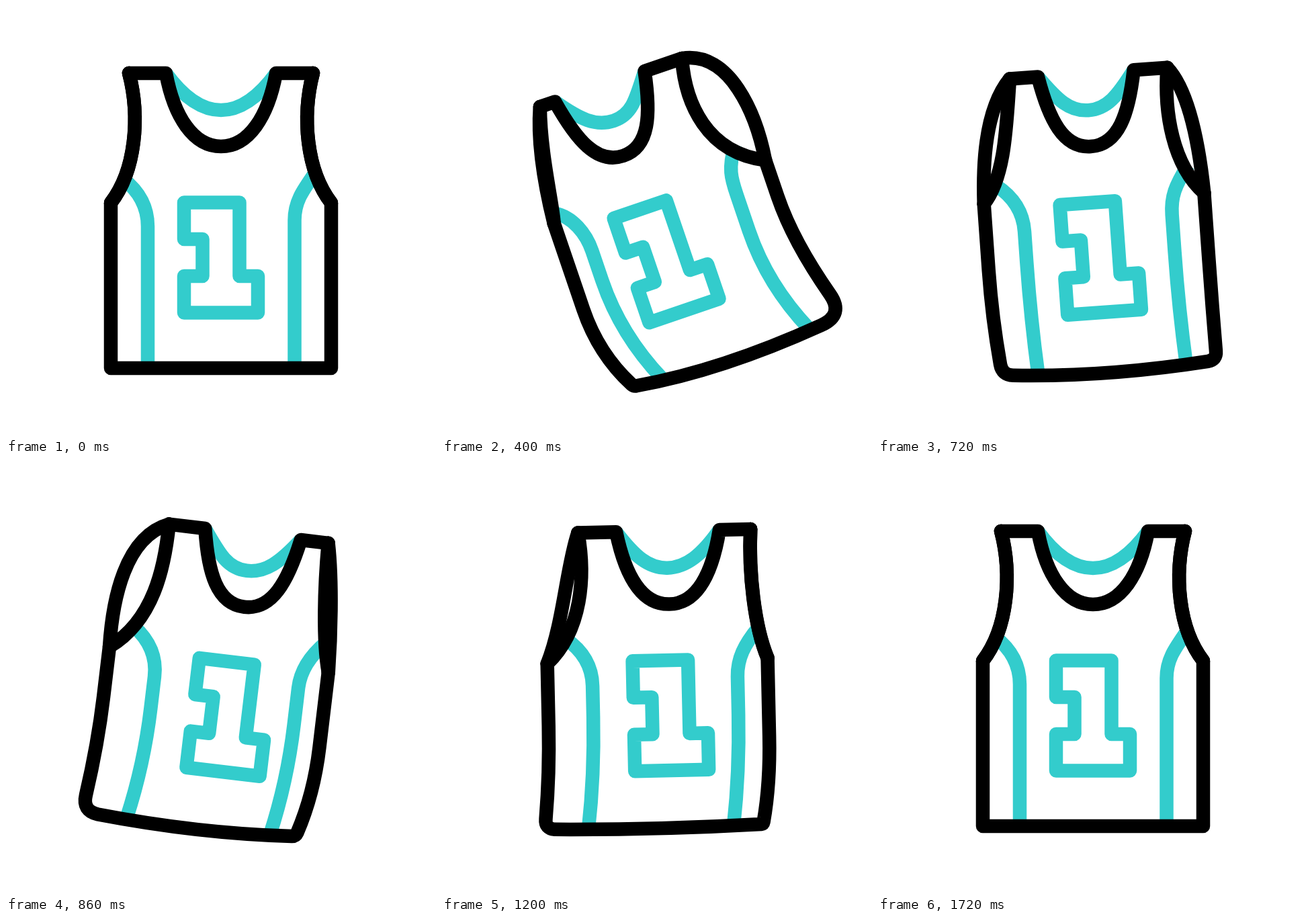
Animation of 640 by 640 pixels, one loop 1760 ms. Source, as an HTML page with a canvas:

```html
<!DOCTYPE html>
<html>
<head>
<meta charset="utf-8">
<title>Jersey</title>
<style>
html, body { margin: 0; height: 100%; overflow: hidden; background: #fff; }
canvas { display: block; width: 100vmin; height: 100vmin; }
</style>
</head>
<body>
<canvas width="640" height="640"></canvas>
<script>
const ctx = document.querySelector('canvas').getContext('2d');
const LOOP = 1760, STEP = 20, TEAL = '#33cccc', BLACK = '#000';

// Swing of the whole shirt: turning points joined by sine easing.
const swingTimes = [0, 455, 970, 1310, 1720];
const swingAngles = [0, -19.5, 10, -4.75, 0];

function swing(t) {
  const i = swingTimes.findIndex(k => k > t) - 1;
  if (i < 0) return 0;
  const x = (t - swingTimes[i]) / (swingTimes[i + 1] - swingTimes[i]);
  const ease = (1 - Math.cos(Math.PI * x)) / 2;
  return swingAngles[i] + (swingAngles[i + 1] - swingAngles[i]) * ease;
}

// Shifts from the rest shape at 240, 560, 720, 1020 and 1400 ms.
const tracks = {
  number: [-12.8, -20.2, 3.5, 33.8, 9.1],
  strapL: [2, 9, 24.5, 44, 11],
  neckL: [-13, -20, 11.5, 47.5, 12],
  neckR: [-25, -41, -9.5, 28, 7],
  strapR: [-21, -38, -14.5, 11, 3],
  frontL: [-15, -27, -2, 33, 6.5],
  frontR: [-16, -39, -7, 34, 10],
  backL: [-15, -32, -35, -42, 5],
  backR: [20, 43, 35, 33, 10],
  pitL: [-12, -20, -10, 2, 0],
  pitR: [-4, -9, -3, -2, 0],
  hemL: [18, 31, 9, -19, -3],
  hemR: [18, 34, 1, -26, -4],
  roundL: [2, 4, 16, 26, 8],
  roundR: [18, 34, 13, 3, 3],
  bow: [5, 9, 7, 6, 1],
  stripeR: [-2, -2, 4.6, 16, 5.5]
};
const times = [0, 240, 455, 560, 720, 970, 1020, 1200, 1400, 1720];

function keys([a, b, c, d, e]) {
  return [0, a, b * 1.17, b, c, d * 1.04, d, e + (d - e) * 0.36, e, 0];
}

// Hermite curve through the keys that never overshoots them.
function spline(v, t) {
  const i = times.findIndex(k => k > t) - 1;
  if (i < 0) return 0;
  const slope = j => (v[j + 1] - v[j]) / (times[j + 1] - times[j]);
  const tangent = j => {
    if (j === 0 || j === times.length - 1) return 0;
    const a = slope(j - 1), b = slope(j);
    return a * b > 0 ? 2 * a * b / (a + b) : 0;
  };
  const h = times[i + 1] - times[i], x = (t - times[i]) / h, y = 1 - x;
  return v[i] * (1 + 2 * x) * y * y + v[i + 1] * (1 + 2 * y) * x * x
    + h * x * y * (tangent(i) * y - tangent(i + 1) * x);
}

for (const name in tracks) tracks[name] = keys(tracks[name]);

function stroke(d, color) {
  ctx.strokeStyle = color;
  ctx.stroke(new Path2D(d));
}

// Armhole; lift pulls the curve up where the far side shows.
function arm(x, side, bend, lift, pitX, pitY) {
  const x1 = x.rest + side * 17 + bend, x2 = x.rest + side * 10 + bend;
  return `M${x.rest + x.shift} 100C${x1} ${165 - lift * 0.6} `
    + `${x2} ${245 - lift * 0.36} ${pitX} ${pitY}`;
}

function stripe(x0, y0, x1, y1, x, y, bottom) {
  return `M${x0} ${y0}C${x1} ${y1} ${x} ${y - 27} ${x} ${y}`
    + `L${x} 375Q${x} 460 ${bottom} 542`;
}

// Side seam with a rounded lower corner; the rounder side bends earlier.
function seam(x, hem, round) {
  const y = 485 - 2 * round;
  const k = round / Math.hypot(x - hem, y - 539);
  return {
    start: `${x} ${y - 70}`,
    bend: `${x} ${y}`,
    end: `${hem + (x - hem) * k} ${539 + (y - 539) * k}`
  };
}

function draw(t) {
  const p = {};
  for (const name in tracks) p[name] = spline(tracks[name], t);

  ctx.setTransform(1, 0, 0, 1, 0, 0);
  ctx.fillStyle = '#fff';
  ctx.fillRect(0, 0, 640, 640);
  ctx.translate(320, 265);
  ctx.rotate(swing(t) * Math.PI / 180);
  ctx.translate(-320, -265);
  ctx.lineWidth = 20.5;
  ctx.lineJoin = 'round';
  ctx.lineCap = 'butt';

  // Back collar
  const turn = (p.neckL + p.neckR) / 2;
  const nl = 238 + p.neckL, nr = 402 + p.neckR, nm = 320 + turn;
  const cm = 320 + turn * 0.9;
  stroke(`M${nl} 100C${nl + 27} 137 ${cm - 28} 155 ${cm} 155`
    + `S${nr - 27} 137 ${nr} 100`, TEAL);

  // Side stripes
  const bend = (p.hemL + p.hemR) * 0.53;
  const top = p.number * 0.55, mid = p.number * 0.65;
  const sl = 211 + mid, sr = 429.5 + p.stripeR;
  const yl1 = 277 - Math.max(0, -p.number) * 0.3;
  const yr1 = 277 - Math.max(0, p.number) * 0.3;
  stroke(stripe(174 + top, 257, 200 + mid, yl1, sl, 328, sl + bend), TEAL);
  stroke(stripe(461 + top, 247, 440 + top, yr1, sr, 319, sr + bend), TEAL);

  // Armholes, back and front
  ctx.lineCap = 'round';
  const yl = 293 + p.pitL, yr = 293 + p.pitR;
  const left = { rest: 183, shift: p.strapL };
  const right = { rest: 457, shift: p.strapR };
  const openL = Math.max(0, p.frontL - p.backL);
  const openR = Math.max(0, p.backR - p.frontR);
  stroke(arm(left, 1, p.backL, openL, 156, yl), BLACK);
  stroke(arm(right, -1, p.backR, openR, 484, yr), BLACK);
  stroke(arm(left, 1, p.frontL, 0, 156, yl), BLACK);
  stroke(arm(right, -1, p.frontR, 0, 484, yr), BLACK);

  // Straps and neckline
  stroke(`M${183 + p.strapL} 100L${nl} 100`
    + `C${nl + 12} 165 ${nm - 41} 209 ${nm} 209`
    + `S${nr - 12} 165 ${nr} 100L${457 + p.strapR} 100`, BLACK);

  // Sides and hem
  const hl = 156 + p.hemL, hr = 484 + p.hemR;
  const rl = p.roundL, rr = p.roundR;
  const a = seam(156, hl, rl), b = seam(484, hr, rr);
  stroke(`M156 ${yl}L${a.start}Q${a.bend} ${a.end}`
    + `Q${hl} 539 ${hl + rl} ${539 + rl * 0.1}`
    + `Q320 ${539 + 2 * p.bow} ${hr - rr} ${539 + rr * 0.1}`
    + `Q${hr} 539 ${b.end}Q${b.bend} ${b.start}L484 ${yr}`, BLACK);

  // Number outline
  ctx.translate(p.number, 0);
  stroke('M265 292.5H347.5V402H375V456.5H265V402H292.5V347H265Z', TEAL);
}

const start = performance.now();
function frame() {
  const t = (performance.now() - start) % LOOP;
  draw(Math.floor(t / STEP) * STEP);
  requestAnimationFrame(frame);
}
frame();
</script>
</body>
</html>
```
